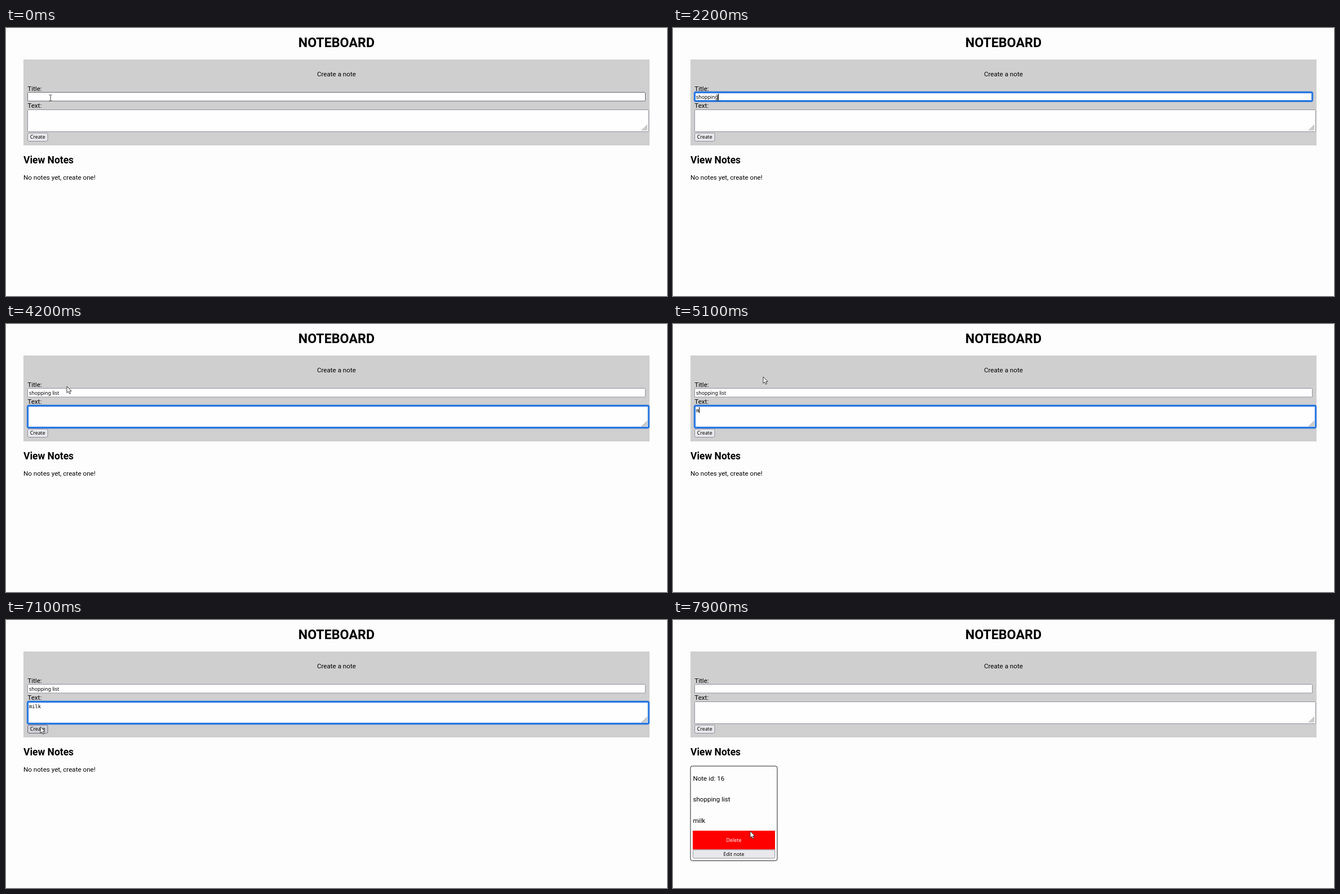
An HTML page for the animation above (8000 ms loop, 1173 by 477 pixels).

```html
<!DOCTYPE html>
<html lang="en">
<head>
<meta charset="utf-8">
<title>Noteboard</title>
<style>
  html, body { margin: 0; width: 100%; height: 100%; overflow: hidden; background: #fdfdfd; }
  svg { display: block; }
  text { font: 11.64px Roboto, sans-serif; white-space: pre; }
  .ui { font: 8.8px "Noto Sans", sans-serif; }
  .mono { font: 8.72px "DejaVu Sans Mono", monospace; }
  .mid { text-anchor: middle; }
  .field { fill: #fefefe; stroke: #8f8f9d; }
  .button { fill: #e9e9ed; stroke: #8f8f9d; }
  .hover { stroke: #676774; }
  .button.hover { fill: #d0d0d7; }
  .button.down { fill: #b1b1b9; stroke: #484851; }
  .halo { fill: none; stroke: #0060df; stroke-opacity: .35; stroke-width: 4.4; }
  .ring { fill: none; stroke: #0060df; stroke-width: 1.8; }
  .caret { stroke: #000; }
</style>
</head>
<body>
<svg width="1173" height="477" viewBox="0 0 1173 477">
  <text class="mid" x="586.4" y="34.4" style="font-size:23.27px;font-weight:700">NOTEBOARD</text>
  <rect x="31" y="56" width="1111" height="153" fill="#cfcfcf"/>
  <text class="mid" x="586.4" y="86">Create a note</text>
  <text x="38.3" y="111.5">Title:</text>
  <text x="38.3" y="141.5">Text:</text>

  <rect id="titleBox" class="field" x="38.5" y="114.5" width="1096" height="15.5" rx="1"/>
  <rect id="bodyBox" class="field" x="38.5" y="145.5" width="1102" height="39" rx="1"/>
  <path d="M1128.500 182.500l9.500-9.500M1131.500 182.500l6.500-6.500M1134.500 182.500l3.500-3.500" stroke="#555" stroke-width=".9"/>
  <g id="focus">
    <rect class="halo" rx="2"/>
    <rect class="ring" rx="1.500"/>
  </g>
  <text id="titleText" class="ui" x="41" y="126"></text>
  <text id="bodyText" class="mono" x="41" y="157"></text>
  <path id="caret" class="caret"/>

  <rect id="create" class="button" x="38.5" y="187" width="35.5" height="14.500" rx="2.500"/>
  <text class="ui mid" x="56.2" y="197.400">Create</text>

  <text x="31" y="240.500" style="font-size:17.45px;font-weight:700">View Notes</text>
  <text id="empty" x="31" y="270">No notes yet, create one!</text>
  <g id="card">
    <rect x="31" y="260" width="154" height="168.500" rx="3.500" fill="none" stroke="#222"/>
    <text x="35.4" y="286">Note id: 16</text>
    <text x="35.4" y="323.400">shopping list</text>
    <text x="35.4" y="360.500">milk</text>
    <rect x="35" y="375" width="146" height="33.500" fill="#f00"/>
    <text class="ui mid" x="108" y="395.300" fill="#fff">Delete</text>
    <rect class="button" x="35.400" y="409" width="145.400" height="15" rx="2.500"/>
    <text class="ui mid" x="108" y="420">Edit note</text>
  </g>

  <path id="arrow" d="M0 0V11.500L2.700 9L4.700 13.300L6.600 12.400L4.700 8.300H8.200Z" fill="#fff" stroke="#222" stroke-width=".9" stroke-linejoin="round"/>
  <path id="beam" d="M-2.500-5H-.700L0-4.300L.700-5H2.500M0-4.300V4.800M-2.500 5.500H-.700L0 4.800L.700 5.500H2.500" fill="none" stroke="#333" stroke-width=".95"/>
</svg>
<script>
const LOOP = 8000, STEP = 100;
const FOCUS_TITLE = 300, FOCUS_BODY = 3300, PRESS = 7200, SAVE = 7400;
const $ = id => document.getElementById(id);
const show = (el, on) => { el.style.display = on ? '' : 'none'; };

const title = {
  word: 'shopping list', box: $('titleBox'), text: $('titleText'), top: 117, height: 11.5,
  keys: [1100, 1300, 1400, 1600, 1700, 1900, 2000, 2200, 2400, 2500, 2700, 2900, 3000]
};
const body = {
  word: 'milk', box: $('bodyBox'), text: $('bodyText'), top: 148, height: 10.5,
  keys: [5100, 5200, 5400, 5500]
};

// Pointer stops: time, x, y
const path = [
  [0, 79, 124], [4000, 79, 124], [4200, 108, 111], [4400, 139, 100], [4600, 160, 94],
  [6400, 160, 94], [6700, 128, 124], [7100, 61, 190], [7400, 61, 190], [7900, 137, 376]
];

function pointerAt(t) {
  let i = path.findIndex(p => p[0] > t);
  if (i < 0) return path[path.length - 1].slice(1);
  const [t0, x0, y0] = path[i - 1], [t1, x1, y1] = path[i];
  const k = (t - t0) / (t1 - t0);
  return [x0 + (x1 - x0) * k, y0 + (y1 - y0) * k];
}

function inside(rect, x, y) {
  const b = rect.getBBox();
  return x >= b.x && x <= b.x + b.width && y >= b.y && y <= b.y + b.height;
}

function drawFocus(field, since, t) {
  show($('focus'), field);
  if (!field) return show($('caret'), false);
  const b = field.box.getBBox();
  for (const r of $('focus').children) {
    for (const name of ['x', 'y', 'width', 'height']) r.setAttribute(name, b[name]);
  }
  const last = Math.max(since, ...field.keys.filter(k => k <= t));
  const x = Math.round(41 + field.text.getComputedTextLength()) + .5;
  $('caret').setAttribute('d', `M${x} ${field.top}v${field.height}`);
  show($('caret'), (t - last) % 1000 < 500);
}

function draw(now) {
  const t = Math.floor(now % LOOP / STEP) * STEP;
  const saved = t >= SAVE;
  const [x, y] = pointerAt(t);

  for (const f of [title, body]) {
    const count = saved ? 0 : f.keys.filter(k => k <= t).length;
    f.text.textContent = f.word.slice(0, count);
    f.box.classList.toggle('hover', inside(f.box, x, y));
  }
  const active = t < FOCUS_TITLE || t >= PRESS ? null : t < FOCUS_BODY ? title : body;
  drawFocus(active, active === title ? FOCUS_TITLE : FOCUS_BODY, t);

  $('create').classList.toggle('hover', inside($('create'), x, y));
  $('create').classList.toggle('down', t >= PRESS && !saved);
  show($('empty'), !saved);
  show($('card'), saved);

  const typing = inside(title.box, x, y) || inside(body.box, x, y);
  show($('beam'), typing);
  show($('arrow'), !typing);
  $(typing ? 'beam' : 'arrow').setAttribute('transform', `translate(${x} ${y})`);
}

const start = performance.now();
(function tick() {
  draw(performance.now() - start);
  requestAnimationFrame(tick);
})();
</script>
</body>
</html>
```
